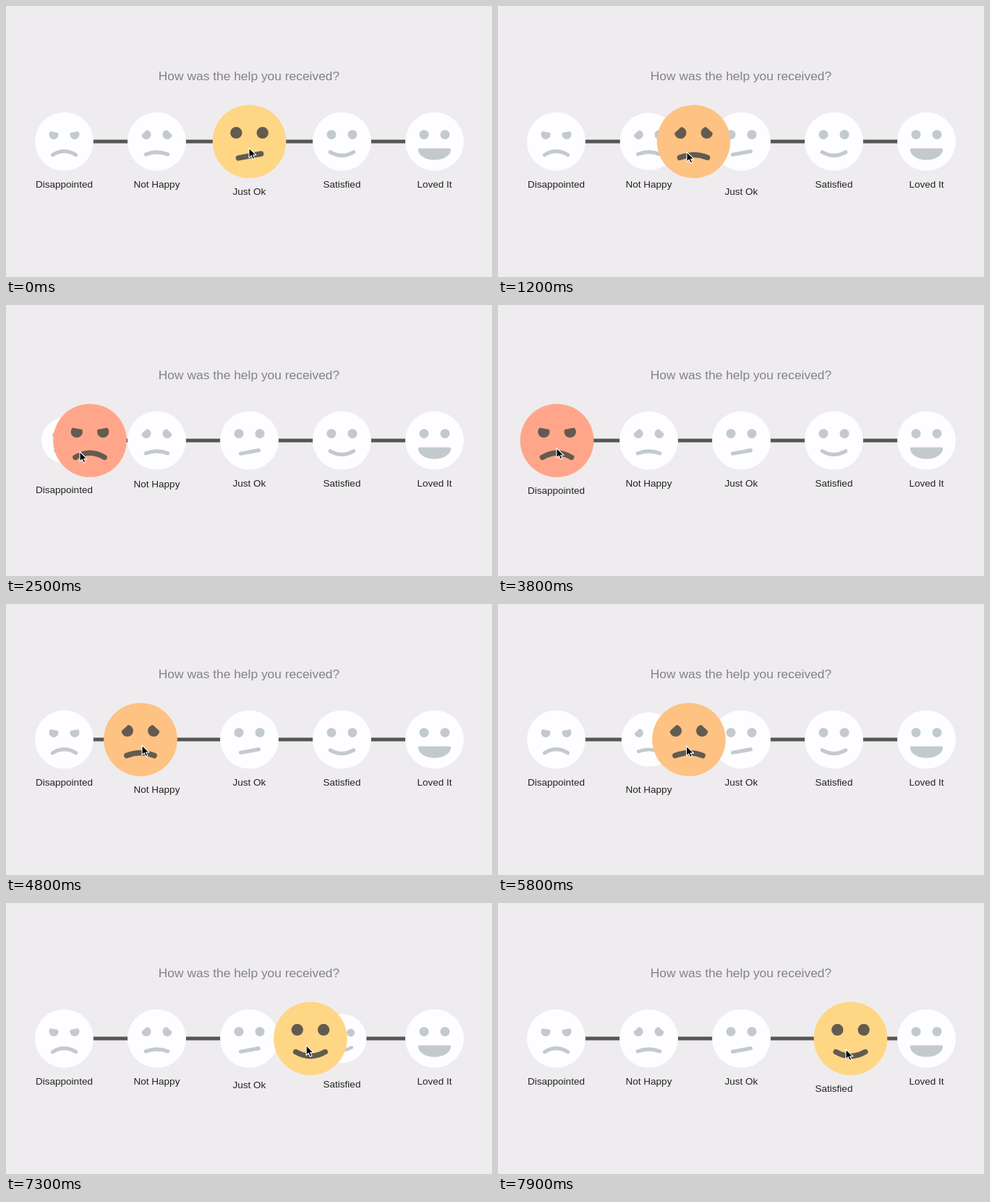
These frames come from a looping animation (672x376 px, 8000 ms). An HTML page:

```html
<!DOCTYPE html>
<html lang="en">
<head>
<meta charset="utf-8">
<title>Feedback slider</title>
<style>
html, body { margin: 0; width: 100%; height: 100%; overflow: hidden; background: #eeecee; }
svg { display: block; width: 672px; height: 376px; }
text { font-family: "Liberation Sans", Arial, sans-serif; text-anchor: middle; }
</style>
</head>
<body>
<svg id="stage" viewBox="0 0 672 376" xmlns="http://www.w3.org/2000/svg">
  <defs>
    <clipPath id="angry"><path d="M-8 -5.2L8 -2.2V8H-8Z"/></clipPath>
    <clipPath id="sad"><path d="M-8 1.6L1.8 -7.4L8 -8V8H-8Z"/></clipPath>
  </defs>
  <rect width="672" height="376" fill="#eeecee"/>
  <text x="336" y="103" font-size="17.4" fill="#838284">How was the help you received?</text>
  <path d="M80.5 188H592.5" stroke="#575657" stroke-width="4.8"/>
  <g id="faces"></g>
  <g id="labels" font-size="13.5" fill="#242324"></g>
  <g id="knob"></g>
  <path id="cursor" d="M0 0V13.7L3.2 10.7L5.4 15.6L7.8 14.6L5.7 9.8H10Z"
        fill="#000" stroke="#fff" stroke-width="1.1" stroke-linejoin="round"/>
</svg>
<script>
const LOOP = 8000, STEP = 100, FIRST = 80.5, GAP = 128, MID_Y = 188;
const SMALL_R = 40.5, BIG = 1.255, LABEL_MS = 240;

const moods = [
  { name: 'Disappointed', color: '#ffa68a', clip: 'angry', mouth: 'M-16 18.6Q0 8.8 16 18.6' },
  { name: 'Not Happy', color: '#fec283', clip: 'sad', mouth: 'M-15.2 17.8Q0 11.8 15.2 17.8' },
  { name: 'Just Ok', color: '#fed684', mouth: 'M-12 18.2L12.8 13.6' },
  { name: 'Satisfied', color: '#fed684', mouth: 'M-16.2 14.8Q0 24 16.2 14.8' },
  { name: 'Loved It', color: '#fed684', open: true,
    mouth: 'M-20 9.6H20Q23.4 9.6 22.5 12.8C20 22 10 25.6 0 25.6S-20 22 -22.5 12.8Q-23.4 9.6 -20 9.6Z' }
];

// Smooth curve through [time, value] points that never overshoots them
function curve(pts) {
  const slope = i => (pts[i + 1][1] - pts[i][1]) / (pts[i + 1][0] - pts[i][0]);
  const tangent = i => {
    if (i === 0) return slope(0);
    if (i === pts.length - 1) return slope(i - 1);
    const a = slope(i - 1), b = slope(i);
    return a * b <= 0 ? 0 : 2 * a * b / (a + b);
  };
  const m = pts.map((p, i) => tangent(i));
  return t => {
    if (t <= pts[0][0]) return pts[0][1];
    const i = pts.findIndex(p => p[0] >= t) - 1;
    if (i < 0) return pts[pts.length - 1][1];
    const [t0, a] = pts[i], [t1, b] = pts[i + 1], h = t1 - t0, u = (t - t0) / h;
    const s = u * u * (3 - 2 * u);
    return a + (b - a) * s + h * u * (1 - u) * (m[i] * (1 - u) - m[i + 1] * u);
  };
}

const knobX = curve([[0, 336.5], [900, 300], [1200, 270.5], [1800, 227], [2500, 116],
  [2700, 93], [3200, 80.5], [3600, 80.5], [3800, 81.5], [4400, 143], [4800, 186],
  [5400, 233], [5500, 233], [6400, 352.5], [6800, 352.5], [7600, 468], [7900, 487.5]]);
const grabX = curve([[0, -0.5], [1200, -9.5], [1800, -9], [2500, -14], [2700, -13],
  [3200, -3], [3600, -0.5], [3800, -0.5], [4800, 2], [5500, -1], [6400, -7.5],
  [6600, -5.5], [6800, -5.5], [7900, -6.5]]);
const cursorY = curve([[0, 197], [1200, 202.5], [2500, 203.5], [3200, 200], [3800, 198.5],
  [4800, 196], [6400, 197.5], [6600, 195], [6800, 195], [7900, 203]]);

const el = id => document.getElementById(id);
const homeX = i => FIRST + GAP * i;
const nearest = x => Math.max(0, Math.min(4, Math.round((x - FIRST) / GAP)));

function face(mood, skin, ink, width) {
  const clip = mood.clip ? ` clip-path="url(#${mood.clip})"` : '';
  const eye = side => `<g transform="translate(${14.5 * side} -9.6) scale(${-side} 1)">` +
    `<circle r="6.5"${clip}/></g>`;
  const mouth = mood.open ? `<path d="${mood.mouth}"/>`
    : `<path d="${mood.mouth}" fill="none" stroke="${ink}" stroke-width="${width}" stroke-linecap="round"/>`;
  return `<circle r="${SMALL_R}" fill="${skin}"/><g fill="${ink}">${eye(-1)}${eye(1)}${mouth}</g>`;
}

el('faces').innerHTML = moods.map(m => `<g>${face(m, '#fefdff', '#c3cacd', 5.2)}</g>`).join('');
el('labels').innerHTML = moods.map((m, i) => `<text x="${homeX(i)}">${m.name}</text>`).join('');
el('knob').innerHTML = moods.map(m => `<g>${face(m, m.color, '#625b4f', 6)}</g>`).join('');
const faces = [...el('faces').children];
const labels = [...el('labels').children];
const knobs = [...el('knob').children];

// Share of the recent past in which a mood was selected, eased
function chosen(i, t) {
  let hits = 0;
  for (let k = 0; k < 24; k++) {
    if (nearest(knobX(t - k * LABEL_MS / 24)) === i) hits++;
  }
  const w = hits / 24;
  return w * w * (3 - 2 * w);
}

function draw(t) {
  const x = knobX(t), active = nearest(x);
  moods.forEach((m, i) => {
    const size = 0.5 + 0.5 * Math.min(1, Math.abs(x - homeX(i)) / (GAP / 2));
    faces[i].setAttribute('transform', `translate(${homeX(i)} ${MID_Y}) scale(${size})`);
    labels[i].setAttribute('y', 251.7 + 10.3 * chosen(i, t));
    knobs[i].setAttribute('display', i === active ? 'inline' : 'none');
  });
  el('knob').setAttribute('transform', `translate(${x} ${MID_Y}) scale(${BIG})`);
  el('cursor').setAttribute('transform', `translate(${x + grabX(t)} ${cursorY(t)})`);
}

const start = performance.now();
function tick(now) {
  const t = Math.max(0, now - start) % LOOP;
  draw(Math.floor(t / STEP) * STEP);
  requestAnimationFrame(tick);
}
draw(0);
requestAnimationFrame(tick);
</script>
</body>
</html>
```
